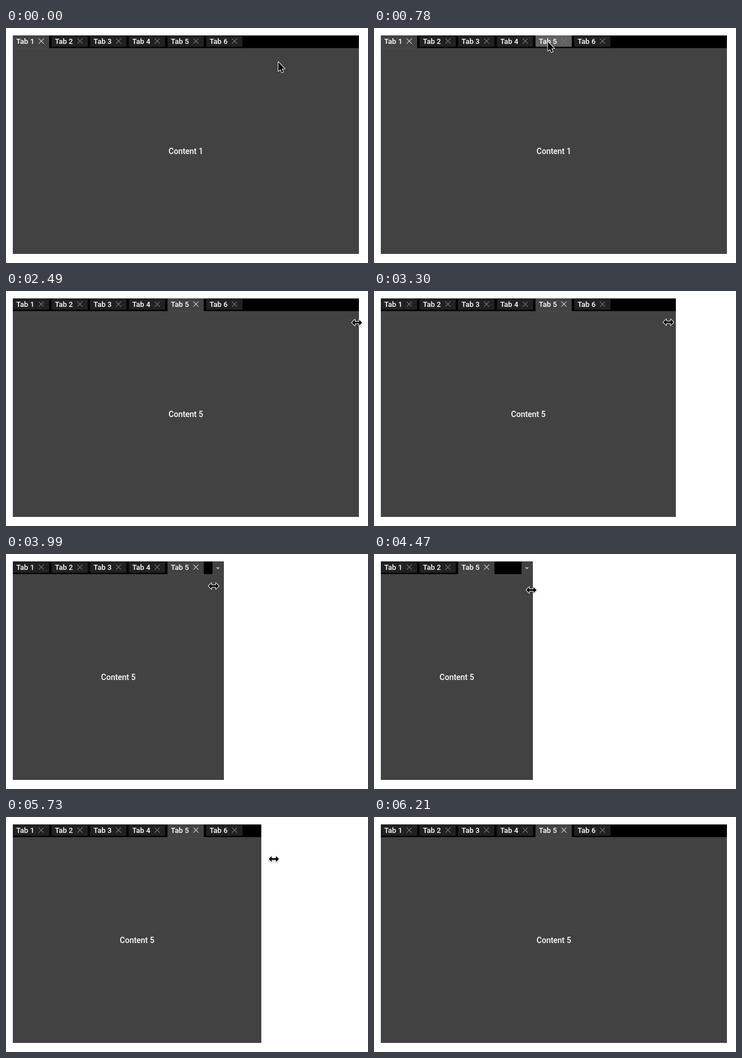
Animation of 638x414 px, one loop 7.47 s. Source, as an HTML page:

```html
<!DOCTYPE html>
<html lang="en">
<head>
<meta charset="utf-8">
<title>Tab overflow</title>
<style>
  html, body { margin: 0; width: 100%; height: 100%; overflow: hidden; background: #fff; }
  svg { display: block; width: 638px; height: 414px; font-family: Roboto, "Open Sans", sans-serif; font-weight: 500; }
  text { fill: #fff; }
  .tab text { font-size: 13px; }
  .tab path { fill: none; stroke: #757575; stroke-width: 1.2; }
  .tab.active path { stroke: #ccc; }
  .tab rect { fill: #212121; }
  .tab.hover rect { fill: #616161; }
  .tab.active rect { fill: #424242; }
  #content { font-size: 14px; text-anchor: middle; }
  .cursor {
    fill: #000; stroke: #fff; stroke-width: 2; stroke-linejoin: round; paint-order: stroke;
    filter: drop-shadow(0 1px 1px rgba(0, 0, 0, .3));
  }
</style>
</head>
<body>
<svg viewBox="0 0 638 414">
  <rect class="wide" x="12" y="13" height="385" fill="#424242"/>
  <rect class="wide" x="12" y="13" height="23" fill="#000"/>
  <rect class="wide" x="12" y="13" height="1" fill="#212121"/>
  <g id="tabs"></g>
  <g id="more">
    <rect x="-20" y="13" width="20" height="23" fill="#424242"/>
    <path d="M-14 23.5h7l-3.5 3.6z" fill="#bdbdbd"/>
  </g>
  <rect class="wide" x="12" y="35.5" height="1" fill="#4a4a4a"/>
  <text id="content" y="222"></text>
  <path id="arrow" class="cursor" d="M0 0V16L3.6 12.7 6 18.4 8.6 17.3 6.2 11.7H11Z"/>
  <path id="resize" class="cursor" d="M-9 0L-3.8 -5.2V-1.6H3.8V-5.2L9 0 3.8 5.2V1.6H-3.8V5.2Z"/>
</svg>
<script>
const LOOP = 7470, TICK = 30;
const LEFT = 12, FULL = 622, PITCH = 68.15, TAB_W = 64, MORE_W = 20;
const CLICK = 1710, GRAB = 2460;
const LAG = 45, GRIP = 3; // the panel edge trails the pointer
const $ = id => document.getElementById(id);

// Pointer stops: time, x, y
const stops = [
  [60, 480, 60], [810, 302, 24], [1170, 268, 23], [1530, 312.5, 24.5], [1680, 312.5, 24.5],
  [2430, 612, 56], [2610, 625, 55], [3000, 625, 55],
  [3300, 519, 55], [3700, 422, 55], [3945, 387, 56], [3990, 366, 56.5],
  [4500, 274, 64], [4800, 250, 70], [5130, 250, 72], [5190, 253, 72],
  [5730, 472, 74], [6210, 655, 74]
];

// Monotone cubic through one column of the stops.
function curve(col) {
  const last = stops.length - 1;
  const slope = i => (stops[i + 1][col] - stops[i][col]) / (stops[i + 1][0] - stops[i][0]);
  const tangent = stops.map((_, i) => {
    if (i === 0 || i === last) return 0;
    const a = slope(i - 1), b = slope(i);
    return a * b > 0 ? 2 * a * b / (a + b) : 0;
  });
  return t => {
    if (t <= stops[0][0]) return stops[0][col];
    if (t >= stops[last][0]) return stops[last][col];
    const i = stops.findIndex(s => s[0] > t) - 1;
    const h = stops[i + 1][0] - stops[i][0];
    const u = (t - stops[i][0]) / h, w = 1 - u;
    return stops[i][col] * (1 + 2 * u) * w * w + stops[i + 1][col] * u * u * (3 - 2 * u)
      + h * u * w * (tangent[i] * w - tangent[i + 1] * u);
  };
}

const pointerX = curve(1), pointerY = curve(2);

function panelRight(t) {
  if (t < GRAB + 500) return FULL;
  return Math.min(FULL, Math.round(pointerX(t - LAG) - GRIP));
}

const tabs = Array.from({ length: 6 }, (_, i) => {
  const g = document.createElementNS("http://www.w3.org/2000/svg", "g");
  g.innerHTML = `<rect y="13" width="${TAB_W}"/><text x="6" y="28">Tab ${i + 1}</text>
    <path d="M45.6 18.6l9 9m0 -9l-9 9"/>`;
  $("tabs").append(g);
  return g;
});

// Indices of the tabs that fit; the active one always keeps a place.
function visibleTabs(right, active) {
  const all = tabs.map((_, i) => i);
  if (LEFT + tabs.length * PITCH <= right) return all;
  const room = Math.floor((right - MORE_W - LEFT + PITCH - TAB_W) / PITCH);
  const shown = all.slice(0, room);
  if (!shown.includes(active)) shown[room - 1] = active;
  return shown;
}

function place(el, x, y) {
  el.setAttribute("transform", `translate(${x} ${y})`);
}

function show(el, on) {
  el.style.display = on ? "" : "none";
}

function draw(t) {
  const active = t < CLICK ? 0 : 4;
  const right = panelRight(t);
  const pointing = t < GRAB;
  const px = pointerX(t), py = pointerY(t);

  for (const el of document.querySelectorAll(".wide")) el.setAttribute("width", right - LEFT);

  const shown = visibleTabs(right, active);
  tabs.forEach((tab, i) => {
    const slot = shown.indexOf(i);
    show(tab, slot >= 0);
    if (slot < 0) return;
    const x = LEFT + slot * PITCH;
    const hover = pointing && py < 33 && px >= x && px < x + TAB_W;
    tab.setAttribute("class", "tab" + (i === active ? " active" : hover ? " hover" : ""));
    tab.firstChild.setAttribute("height", i === active ? 23 : 20);
    place(tab, x, 0);
  });

  show($("more"), shown.length < tabs.length);
  place($("more"), right, 0);

  $("content").textContent = `Content ${active + 1}`;
  $("content").setAttribute("x", (LEFT + right) / 2);

  show($("arrow"), pointing);
  show($("resize"), !pointing);
  place($(pointing ? "arrow" : "resize"), px, py);
}

const start = performance.now();
function frame() {
  const t = (performance.now() - start) % LOOP;
  draw(Math.floor(t / TICK) * TICK);
  requestAnimationFrame(frame);
}
draw(0);
requestAnimationFrame(frame);
</script>
</body>
</html>
```
